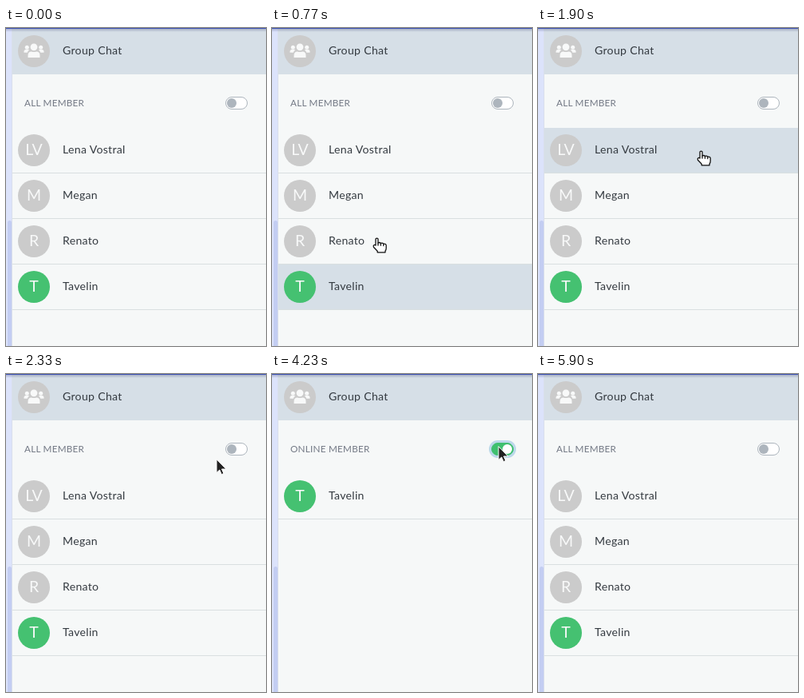
Write an HTML page that moves like this. It is 326 px wide and 398 px high and loops after 5930 ms.

```html
<!DOCTYPE html>
<html lang="en">
<head>
<meta charset="utf-8">
<title>Member list</title>
<style>
  html, body { margin: 0; width: 100%; height: 100%; overflow: hidden; background: #f6f8f8; }
  svg { display: block; width: 326px; height: 398px; font-family: Lato, "Open Sans", sans-serif; }
  .name { font-size: 14.1px; letter-spacing: .3px; fill: #343a40; }
  .title { font-size: 11.7px; letter-spacing: .25px; fill: #737985; }
  .initials { font-size: 19.5px; fill: #f8f9f9; text-anchor: middle; }
  .hover { fill: #d6dfe7; }
  .line { fill: #d9dfe0; }
</style>
</head>
<body>
<svg viewBox="0 0 326 398">
  <defs>
    <linearGradient id="shade" x2="0" y2="1">
      <stop stop-color="#323c6e" stop-opacity=".3"/>
      <stop offset="1" stop-color="#323c6e" stop-opacity="0"/>
    </linearGradient>
  </defs>
  <rect width="326" height="398" fill="#f6f8f8"/>
  <rect width="8" height="398" fill="#dce3fb"/>
  <rect x="2" y="241" width="5" height="165" rx="2.5" fill="#c3cdf2"/>
  <rect x="7" width="1" height="398" fill="#d9dfec"/>

  <rect class="hover" x="8" y="1" width="318" height="57"/>
  <circle cx="35" cy="29" r="20" fill="#cbcbcb"/>
  <g fill="#f8f9f9">
    <circle cx="26.3" cy="24.3" r="2.5"/>
    <circle cx="43.7" cy="24.3" r="2.5"/>
    <circle cx="35" cy="23.800" r="4.400"/>
    <path d="M22.500 30.800v-1.400q0-2.500 2.500-2.500h2.500q1 0 1.800.7q-2.200 1.200-2.500 3.200zM47.500 30.800v-1.400q0-2.500-2.500-2.500h-2.500q-1 0-1.800.7q2.200 1.200 2.500 3.200z"/>
    <path d="M27.500 37v-2.600q0-5 4.500-5q3 1.200 6 0q4.500 0 4.500 5v2.600z"/>
  </g>
  <text class="name" x="71" y="33">Group Chat</text>
  <rect y="1" width="326" height="4" fill="url(#shade)"/>
  <rect width="326" height="1" fill="#3c50b0"/>

  <text class="title" id="title" x="23" y="98"></text>
  <rect id="ring" x="272" y="83" width="34" height="22" rx="11" fill="#bcd8ea"/>
  <rect id="track" x="275.500" y="86.500" width="27" height="15" rx="7.500"/>
  <circle id="knob" cy="94" r="6"/>

  <g id="rows"></g>

  <g id="cursor" stroke-linejoin="round" stroke-linecap="round">
    <path id="arrow" d="M0 0V16.500L3.800 13L6.300 18.700L9 17.500L6.500 12H11.700Z" fill="#222" stroke="#fff"/>
    <g id="hand" fill="#fff" stroke="#111" stroke-width="1.300">
      <path d="M-3 9V1.700Q-3 .2-1.500 .2Q0 .2 0 1.700V6Q2 4.800 3.400 6.400Q5.400 5.500 6.800 7.200Q10.200 6.600 10.200 9.600V12.500Q10.200 14.800 9 16V17.800H-.8V16.200L-5.600 11.300Q-6.400 9.400-5 8.600Q-3.900 8.200-3 9Z"/>
      <path d="M0 6.200V9M3.400 6.600V9.200M6.800 7.400V9.600" fill="none"/>
    </g>
  </g>
</svg>
<script>
const LOOP = 5930, HOVER_LAG = 40;
const SWITCH_ON = 2830, SWITCH_OFF = 4470, SWITCH_TIME = 150, PRESS = 70;
const LIST_TOP = 125, ROW = 57;
const $ = id => document.getElementById(id);

const members = [
  { name: 'Lena Vostral', initials: 'LV' },
  { name: 'Megan', initials: 'M' },
  { name: 'Renato', initials: 'R' },
  { name: 'Tavelin', initials: 'T', online: true }
];

// Pointer path: time, x, y
const path = [
  [60, 334, 150], [330, 190, 190], [560, 130, 250], [690, 128, 325],
  [770, 133, 264], [1080, 150, 140], [1300, 165, 150], [1470, 175, 251],
  [1620, 185, 325], [1900, 206, 154], [2150, 235, 135], [2400, 270, 100],
  [2650, 277, 91], [3700, 277, 91], [3850, 284, 91], [4900, 284, 91],
  [5180, 283, -26]
];

$('rows').innerHTML = members.map(m => `<g>
  <rect class="hover" x="8" width="318" height="${ROW}"/>
  <rect class="line" x="8" y="${ROW - 1}" width="318" height="1"/>
  <circle cx="35" cy="28" r="20" fill="${m.online ? '#45c171' : '#cbcbcb'}"/>
  <text class="initials" x="35" y="34">${m.initials}</text>
  <text class="name" x="71" y="32">${m.name}</text></g>`).join('');
const rows = [...$('rows').children];

const clamp = v => Math.min(1, Math.max(0, v));
const ramp = (t, start, length) => {
  const u = clamp((t - start) / length);
  return u * u * (3 - 2 * u);
};
const mix = (a, b, u) => a.map((v, i) => v + (b[i] - v) * u);
const rgb = c => `rgb(${c.map(Math.round)})`;

const slope = (i, k) => (path[i + 1][k] - path[i][k]) / (path[i + 1][0] - path[i][0]);

// Monotone tangent: zero at turns and rests
function tangent(i, k) {
  if (i === 0 || i === path.length - 1) return 0;
  const a = slope(i - 1, k), b = slope(i, k);
  return a * b > 0 ? 2 * a * b / (a + b) : 0;
}

function pointer(t) {
  const last = path.length - 1;
  if (t <= path[0][0]) return path[0].slice(1);
  if (t >= path[last][0]) return path[last].slice(1);
  const i = path.findIndex(p => p[0] > t) - 1;
  const span = path[i + 1][0] - path[i][0];
  const u = (t - path[i][0]) / span, v = 1 - u;
  return [1, 2].map(k =>
    path[i][k] * v * v * (1 + 2 * u) + path[i + 1][k] * u * u * (3 - 2 * u) +
    span * u * v * (v * tangent(i, k) - u * tangent(i + 1, k)));
}

const WHITE = [255, 255, 255], GRAY = [173, 181, 189], GREEN = [63, 192, 111];
const PRESSED = [214, 233, 255], FOCUS = [161, 203, 230];

function drawSwitch(t) {
  const on = ramp(t, SWITCH_ON, SWITCH_TIME) - ramp(t, SWITCH_OFF, SWITCH_TIME);
  const focus = ramp(t, 2890, 120) - ramp(t, 5500, SWITCH_TIME);
  const press = ramp(t, SWITCH_ON - PRESS, PRESS) - ramp(t, SWITCH_OFF, SWITCH_TIME);
  const idle = mix(WHITE, PRESSED, press);
  const edge = mix(mix(GRAY, PRESSED, press), FOCUS, focus);
  $('track').setAttribute('fill', rgb(mix(idle, GREEN, on)));
  $('track').setAttribute('stroke', rgb(mix(edge, GREEN, on)));
  $('knob').setAttribute('fill', rgb(mix(GRAY, WHITE, on)));
  $('knob').setAttribute('cx', 283 + 12 * on);
  $('ring').setAttribute('opacity', focus);
}

function draw(t) {
  const filtered = t >= SWITCH_ON && t < SWITCH_OFF;
  const [x, y] = pointer(t);
  const [seenX, seenY] = pointer(t - HOVER_LAG);
  const hovered = seenX < 326 ? Math.floor((seenY - LIST_TOP) / ROW) : -1;
  let place = 0;
  rows.forEach((row, i) => {
    const shown = !filtered || members[i].online;
    row.style.display = shown ? '' : 'none';
    if (!shown) return;
    row.setAttribute('transform', `translate(0 ${LIST_TOP + ROW * place})`);
    row.firstElementChild.style.display = hovered === place ? '' : 'none';
    place++;
  });
  $('title').textContent = filtered ? 'ONLINE MEMBER' : 'ALL MEMBER';
  drawSwitch(t);

  const clickable = hovered >= 0 || seenY < 58;
  $('hand').style.display = clickable ? '' : 'none';
  $('arrow').style.display = clickable ? 'none' : '';
  $('cursor').setAttribute('transform', `translate(${Math.round(x)} ${Math.round(y)})`);
  $('cursor').style.display = t < path[0][0] || y < -24 ? 'none' : '';
}

const start = performance.now();
function tick() {
  draw((performance.now() - start) % LOOP);
  requestAnimationFrame(tick);
}
tick();
</script>
</body>
</html>
```
